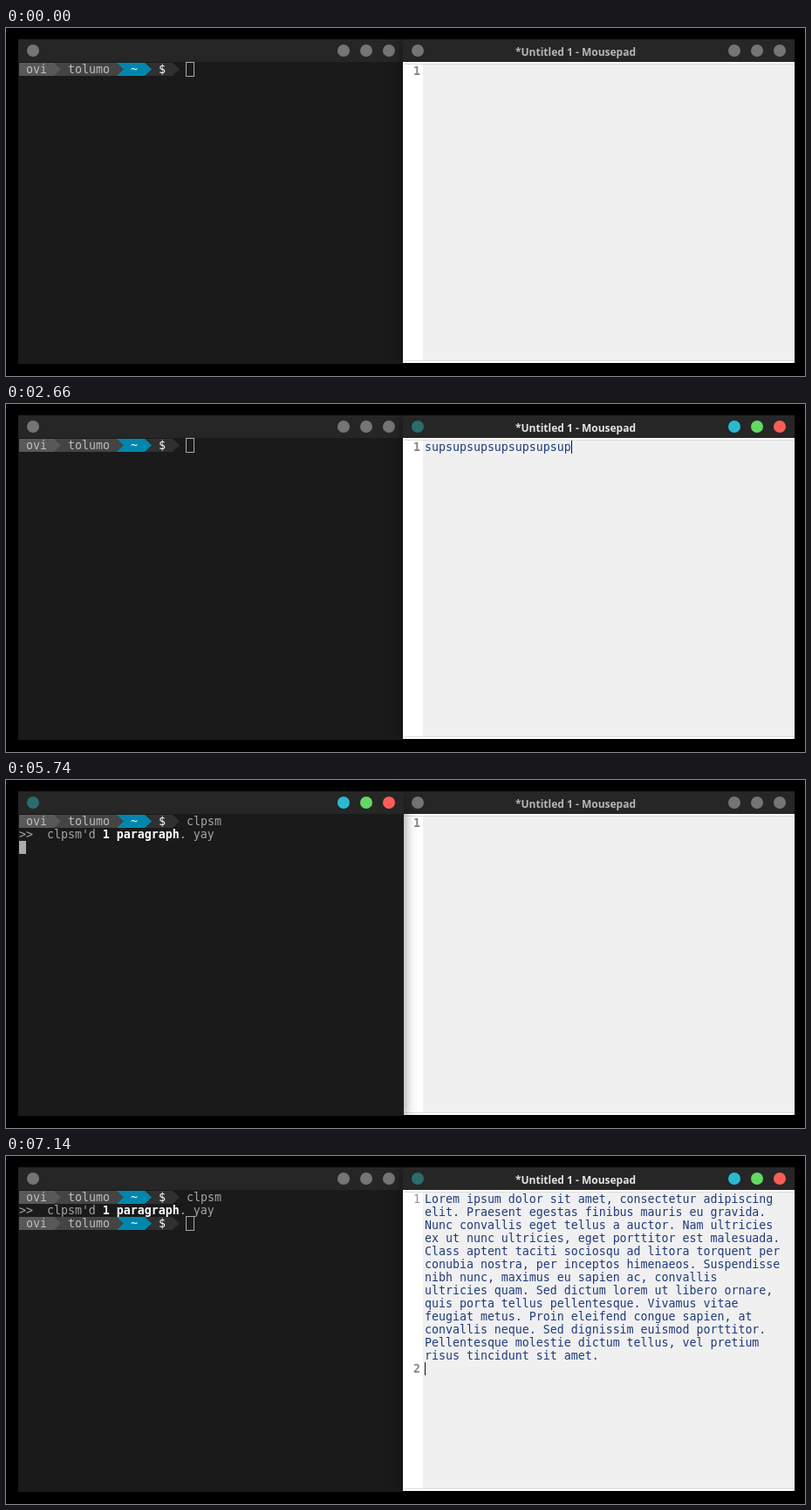
Animation, 916 px wide and 400 px high, one loop 8000 ms. Source, as an HTML page:

```html
<!DOCTYPE html>
<html lang="en">
<head>
<meta charset="utf-8">
<title>Terminal and editor</title>
<style>
html, body { margin: 0; width: 100%; height: 100%; overflow: hidden; background: #000; }
#stage { position: relative; width: 916px; height: 400px; overflow: hidden; background: #000; }
#stage div { position: absolute; }
.win { top: 13px; box-shadow: 0 2px 14px rgba(0,0,0,.5); }
#term { left: 14px; width: 442px; height: 373px; background: #1a1a1a; }
#edit { left: 455px; width: 449px; height: 372px; background: #fff; }
.bar { left: 0; top: 0; width: 100%; height: 26px; background: #262626; }
.dot { top: 6px; width: 14px; height: 14px; border-radius: 50%; background: #757575; }
.on .menu { background: #2b6c6c; }
.on .min { background: #2bb9cf; }
.on .max { background: #64d962; }
.on .close { background: #fc5d57; }
#name { left: 48px; top: 6px; width: 300px; text-align: center; white-space: pre;
  font: bold 12px/17px "Open Sans", "Noto Sans", sans-serif; color: #b3b7ba; }
.on #name { color: #e4e4e4; }
.mono { font: 13.288px/15px "DejaVu Sans Mono", monospace; white-space: pre;
  font-variant-ligatures: none; font-kerning: none; }
.row { left: 1px; height: 15px; color: #a6a6a6; }
.row b { color: #fff; }
.seg { top: 0; height: 15px; }
.tip { top: 0; width: 8px; height: 15px; clip-path: polygon(0 0, 100% 50%, 0 100%); }
#cursor { box-sizing: border-box; width: 10px; height: 17px; border: 1px solid #aaa; }
.on #cursor { width: 8px; height: 15px; margin: 1px; border: 0; background: #aaa; }
#page { left: 23px; top: 28px; width: 425px; height: 341px; background: #f0f0f0; }
.rule { left: 1px; width: 448px; height: 1px; background: #dadddd; }
.num { left: 12px; color: #858585; font-weight: bold; }
.num.dim { color: #949494; font-weight: normal; }
#text { left: 25px; top: 29px; color: #1f3b7c; }
#text.sel span { background: #5294e2; color: #fff; }
#caret { width: 1px; height: 15px; background: #111; }
</style>
</head>
<body>
<div id="stage">
  <div id="term" class="win"><div class="bar"></div></div>
  <div id="edit" class="win">
    <div class="bar"><div id="name">*Untitled 1 - Mousepad</div></div>
    <div id="page"></div>
    <div class="rule" style="top:28px"></div>
    <div class="rule" style="top:369px"></div>
    <div id="one" class="mono num" style="top:29px">1</div>
    <div id="two" class="mono num" style="top:224px">2</div>
    <div id="text" class="mono"><span></span></div>
    <div id="caret"></div>
  </div>
</div>
<script>
const LOOP = 8000, CELL = 8, LINE = 15;
const $ = id => document.getElementById(id);
const term = $('term'), edit = $('edit');

function add(parent, cls, css = '', html = '') {
  const el = document.createElement('div');
  el.className = cls;
  el.style.cssText = css;
  el.innerHTML = html;
  parent.appendChild(el);
  return el;
}

function dots(win, xs) {
  ['menu', 'min', 'max', 'close'].forEach((kind, i) =>
    add(win.querySelector('.bar'), 'dot ' + kind, `left:${xs[i]}px`));
}
dots(term, [10, 366, 392, 418]);
dots(edit, [10, 373, 399, 425]);

const row = n => add(term, 'mono row', `top:${27 + n * LINE}px`);

// Each segment: label, text colour, background.
function prompt(n) {
  const line = row(n);
  const segs = [['ovi', '#bcbcbc', '#585858'], ['tolumo', '#bcbcbc', '#444'],
    ['~', '#fff', '#0087af'], ['$', '#fff', '#303030']];
  let x = 0;
  segs.forEach(([label, fg, bg], i) => {
    const w = (label.length + 2) * CELL;
    add(line, 'seg', `left:${x}px;width:${w}px;background:${bg};color:${fg}`, ` ${label} `);
    x += w;
    const next = segs[i + 1];
    if (next) add(line, 'seg', `left:${x}px;width:${CELL}px;background:${next[2]}`);
    add(line, 'tip', `left:${x}px;background:${bg}`);
    x += CELL;
  });
  return line;
}

prompt(0);
const typed = add(term, 'mono row', 'top:27px;left:193px');
const output = row(1);
output.innerHTML = "&gt;&gt;  clpsm'd <b>1 paragraph</b>. yay";
const prompt2 = prompt(2);
const cursor = add(term, '');
cursor.id = 'cursor';

const LOREM = `Lorem ipsum dolor sit amet, consectetur adipiscing
elit. Praesent egestas finibus mauris eu gravida.
Nunc convallis eget tellus a auctor. Nam ultricies
ex ut nunc ultricies, eget porttitor est malesuada.
Class aptent taciti sociosqu ad litora torquent per
conubia nostra, per inceptos himenaeos. Suspendisse
nibh nunc, maximus eu sapien ac, convallis
ultricies quam. Sed dictum lorem ut libero ornare,
quis porta tellus pellentesque. Vivamus vitae
feugiat metus. Proin eleifend congue sapien, at
convallis neque. Sed dignissim euismod porttitor.
Pellentesque molestie dictum tellus, vel pretium
risus tincidunt sit amet.
`;
const sup = n => 'sup'.repeat(n);

const tracks = {
  focus: [[0, ''], [70, 'edit'], [4480, 'term'], [6790, 'edit']],
  text: [[0, ''], [700, 's'], [770, 'su'], [910, 'sup'], [2030, sup(2)], [2170, sup(3)],
    [2310, sup(4)], [2450, sup(5)], [2590, sup(6)], [2660, sup(7)], [3360, ''], [7140, LOREM]],
  selected: [[0, false], [1190, true], [1750, false], [3150, true], [3360, false]],
  caret: [[0, true], [490, false], [700, true]],
  command: [[0, ''], [5040, 'c'], [5180, 'clp'], [5390, 'clps'], [5460, 'clpsm']],
  stage: [[0, 0], [5740, 1], [5810, 2]],
  cursor: [[0, true], [6300, false], [6790, true]]
};

function at(track, t) {
  let value;
  for (const [start, v] of track) if (start <= t) value = v;
  return value;
}

const show = (el, on) => { el.style.visibility = on ? 'visible' : 'hidden'; };
const place = (el, x, y) => { el.style.left = x + 'px'; el.style.top = y + 'px'; };

let last = '';
function draw(t) {
  const s = {};
  for (const key in tracks) s[key] = at(tracks[key], t);
  const key = JSON.stringify(s);
  if (key === last) return;
  last = key;

  for (const win of [term, edit]) {
    win.classList.toggle('on', win.id === s.focus);
    win.style.zIndex = (win === term) === (s.focus === 'term') ? 2 : 1;
  }

  $('text').firstChild.textContent = s.text;
  $('text').classList.toggle('sel', s.selected);
  const lines = s.text.split('\n');
  const end = lines.length - 1;
  place($('caret'), 25 + lines[end].length * CELL, 29 + end * LINE);
  show($('caret'), s.caret && !s.selected && s.focus === 'edit');
  $('one').classList.toggle('dim', end > 0);
  show($('two'), end > 0);

  typed.textContent = s.command;
  show(output, s.stage > 0);
  show(prompt2, s.stage > 1);
  const col = s.stage === 0 ? 24 + s.command.length : s.stage === 1 ? 0 : 24;
  place(cursor, col * CELL, 26 + (s.stage ? 2 : 0) * LINE);
  show(cursor, s.cursor);
}

const begin = performance.now();
function tick() {
  draw((performance.now() - begin) % LOOP);
  requestAnimationFrame(tick);
}
draw(0);
tick();
</script>
</body>
</html>
```
